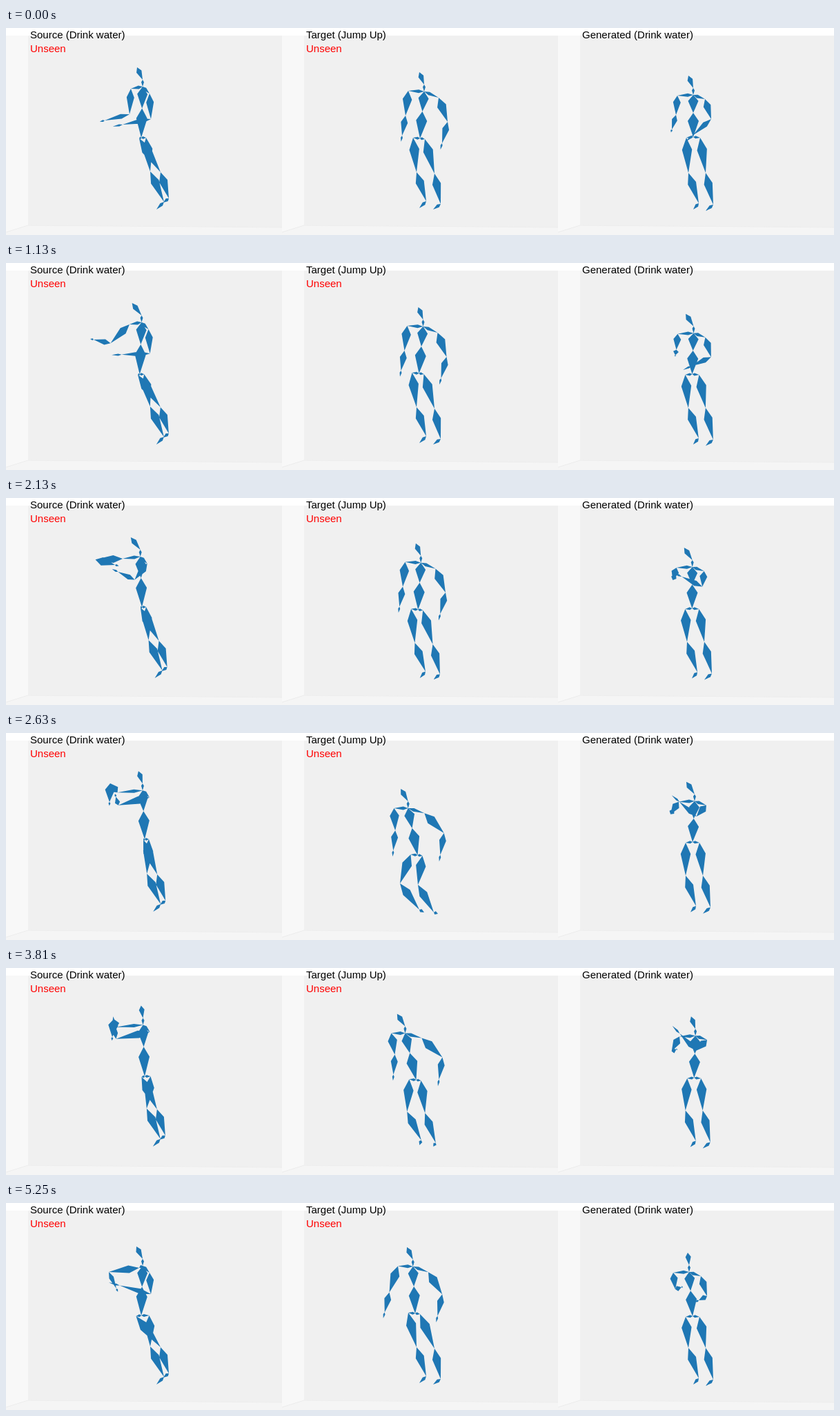
These frames come from a looping animation (1200x300 px, 5.31 s). An HTML page:

```html
<!DOCTYPE html>
<html lang="en">
<head>
<meta charset="utf-8">
<title>Motion transfer</title>
<style>
html, body { margin: 0; width: 100%; height: 100%; overflow: hidden; background: #fff; }
svg { display: block; width: 1200px; height: 300px; }
text { font: 15px "Liberation Sans", Arial, sans-serif; }
.figure { fill: #1f77b4; }
</style>
</head>
<body>
<svg viewBox="0 0 1200 300">
  <defs>
    <g id="room">
      <path d="M0 11H32V286L0 296Z" fill="#f8f8f8"/>
      <path d="M32 11H400V289L32 286Z" fill="#f0f0f0"/>
      <path d="M0 296L32 286L400 289V300H0Z" fill="#f5f5f5"/>
      <path d="M0 296L32 286L400 289" fill="none" stroke="#ececec"/>
    </g>
  </defs>
  <use href="#room"/>
  <use href="#room" x="400"/>
  <use href="#room" x="800"/>
  <path class="figure"/>
  <path class="figure"/>
  <path class="figure"/>
  <text x="35" y="15">Source (Drink water)</text>
  <text x="35" y="35" fill="#f00">Unseen</text>
  <text x="435" y="15">Target (Jump Up)</text>
  <text x="435" y="35" fill="#f00">Unseen</text>
  <text x="835" y="15">Generated (Drink water)</text>
</svg>
<script>
const LOOP = 5310, STEPS = 85;

// Bone widths from the root of each limb outwards.
const SPINE = [8, 4, 15, 16], LEG = [4, 14.5, 12.5, 5];
const armWidths = (upper, fore) => [5, upper, fore, 3];

const add = (p, q, k = 1) => [p[0] + q[0] * k, p[1] + q[1] * k];
const mix = (p, q, k) => [p[0] + (q[0] - p[0]) * k, p[1] + (q[1] - p[1]) * k];

// Eased values between keys of the form [frame, value, ...].
function track(...keys) {
  // Flat at turning points so that nothing overshoots.
  const slope = (i, n) => {
    if (i < 1 || i > keys.length - 2) return 0;
    const rate = k => (keys[k + 1][n] - keys[k][n]) / (keys[k + 1][0] - keys[k][0]);
    const a = rate(i - 1), b = rate(i);
    return a * b <= 0 ? 0 : 2 * a * b / (a + b);
  };
  return frame => {
    const i = keys.findLastIndex(k => k[0] <= frame);
    if (i < 0) return keys[0].slice(1);
    const a = keys[i], b = keys[i + 1];
    if (!b) return a.slice(1);
    const h = b[0] - a[0], s = (frame - a[0]) / h, e = s * s * (3 - 2 * s);
    return a.map((v, n) => n && v + (b[n] - v) * e +
      h * s * (1 - s) * ((1 - s) * slope(i, n) - s * slope(i + 1, n))).slice(1);
  };
}

// Kite-shaped bone, widest a third of the way along.
function kite([x1, y1], [x2, y2], w) {
  const dx = x2 - x1, dy = y2 - y1, half = w / 2 / (Math.hypot(dx, dy) || 1);
  const m = mix([x1, y1], [x2, y2], .34), side = [-dy, dx];
  return 'M' + [[x1, y1], add(m, side, half), [x2, y2], add(m, side, -half)]
    .map(p => p.map(v => v.toFixed(2)).join(' ')).join('L') + 'Z';
}
const chain = (pts, widths) => widths.map((w, i) => kite(pts[i], pts[i + 1], w)).join('');

function spine(neck, pelvis, nod) {
  const base = add(neck, [0, -10]);
  return chain([add(base, [nod, -18]), base, neck, mix(neck, pelvis, .425), pelvis], SPINE);
}

// The hand carries on in the direction of the forearm.
function arm(neck, shoulder, elbow, wrist, widths, hand = .3) {
  return chain([neck, shoulder, elbow, wrist, mix(elbow, wrist, 1 + hand)], widths);
}

function leg(pelvis, hip, knee, ankle, toe) {
  return chain([pelvis, add(pelvis, hip), knee, ankle, toe], LEG);
}

// Shared by both drinkers: how far the second arm is lifted to the mouth.
const raise = track([10, 0], [26, .08], [42, .8], [51, 1], [71, .57], [84, 0]);

const drinker = {
  neck: track([0, 198, 85], [10, 200, 86], [26, 193, 86], [51, 200, 82], [71, 197, 84], [84, 198, 91]),
  pelvis: track([0, 196, 159], [26, 193, 162], [42, 201, 154], [51, 198, 158], [71, 204, 156], [84, 196, 163]),
  nod: track([0, -8], [10, -9], [26, -18], [51, -1], [84, -9]),
  twist: track([0, 5], [42, 4], [51, 9], [71, 4], [84, 9.5]),
  shoulder: track([10, -17], [26, -19], [51, -43], [71, -28], [84, -5]),
  elbow: track([0, 179, 125], [10, 160, 122], [26, 142, 107], [31, 125, 97], [42, 151, 73],
    [71, 157, 75], [84, 149, 100]),
  wrist: track([0, 143, 134], [10, 152, 142], [18, 127, 111], [26, 163, 94], [42, 150, 100],
    [51, 144, 92], [71, 164, 108], [79, 120, 108], [84, 160, 124]),
  lift: track([10, 0], [26, .3], [42, .7], [51, 1], [71, .7], [84, .3]),
  draw(f) {
    const neck = this.neck(f), pelvis = this.pelvis(f), [up] = raise(f), [twist] = this.twist(f);
    const step = p => add(p, [-6, -5], up);
    return spine(neck, pelvis, this.nod(f)[0]) +
      arm(neck, add(neck, [this.shoulder(f)[0], 3]), this.elbow(f), this.wrist(f),
        armWidths(11, 7 + 8 * Math.sqrt(up)), .2) +
      arm(neck, add(neck, [10, 10]), mix([210, 132], [151, 98], up),
        mix([169, 140], [155, 72], this.lift(f)[0]), armWidths(11, 7.5), .35) +
      leg(pelvis, [2 - twist, 1], step([224, 209]), step([236, 247]), step([228, 253])) +
      leg(pelvis, [2 + twist, 0], step([209, 208]), step([229, 252]), step([218, 263]));
  }
};

const jumper = {
  lean: track([32, 0], [42, .9], [51, 1], [71, 1], [84, .42]),
  swing: track([32, 0], [42, .7], [71, 1.05], [84, -.6]),
  crouch: track([32, 0], [42, 1], [47, .5], [51, .35], [56, .35], [64, .6], [71, .1], [84, 0]),
  hop: track([42, 0], [51, 1], [55, 1], [63, 0]),
  draw(f) {
    const [lean] = this.lean(f), [swing] = this.swing(f), [low] = this.crouch(f), [hop] = this.hop(f);
    const pelvis = [600 - f / 12 - 3 * hop, 160 + 17 * low - 42 * hop];
    const neck = add(pelvis, [6 - 22 * lean, -68 + 2 * hop]);
    const from = (rest, shift, k) => add(add(neck, rest), shift, k);
    const knee = p => add(add(p, [-24, 9], low), [-8, -35], hop);
    const foot = p => add(add(p, [-10, 5], low), [-13, -27], hop);
    const toe = p => foot(add(p, [17, -6], low * (1 - hop)));
    const widths = armWidths(13.5, 10);
    return spine(neck, pelvis, -7 - 4 * lean - 4 * hop) +
      arm(neck, from([-23, -1], [3, 1], lean), from([-27, 35], [12, -4], swing),
        from([-32, 64], [15, -4], swing), widths) +
      arm(neck, from([21, 9], [3, -2], lean), from([34, 44], [20, -9], lean),
        from([26, 75], [23, -8], lean), widths) +
      leg(pelvis, [-10, -1], knee([595, 209]), foot([609, 251]), toe([599, 261])) +
      leg(pelvis, [7, 1], knee([621, 211]), foot([630, 255]), toe([619, 263]));
  }
};

const follower = {
  neck: track([0, 996, 97], [10, 1000, 102], [26, 993, 101], [51, 1000, 98], [71, 997, 99], [84, 990, 100]),
  pelvis: track([0, 996, 158], [26, 994, 162], [42, 995, 158], [51, 996, 158], [71, 998, 161], [84, 995, 164]),
  nod: track([0, -7], [10, -11], [42, -12], [51, -9], [84, -2]),
  // Arm joints, relative to the neck.
  elbow: track([10, -25, 29], [26, -25, 19], [51, -39, 19], [71, -27, 26], [84, -20, 25]),
  wrist: track([0, -31, 50], [10, -32, 56], [26, -21, 8], [51, -33, 13], [71, -19, 25], [84, -11, 22]),
  reach: track([10, 0, 58], [26, -8, 30], [42, -22, 1], [51, -25, -6], [71, -17, 3], [84, 14, 41]),
  draw(f) {
    const neck = this.neck(f), pelvis = this.pelvis(f), [up] = raise(f);
    const at = p => add(neck, p), step = p => add(p, [-5, -4], up);
    const widths = armWidths(11, 8);
    return spine(neck, pelvis, this.nod(f)[0]) +
      arm(neck, at([-23, 1]), at(this.elbow(f)), at(this.wrist(f)), widths, .2) +
      arm(neck, at([17, 6]), at(mix([26, 35], [-3, 19], up)), at(this.reach(f)), widths, .45) +
      leg(pelvis, [-10, 1], step([989, 210]), step([1004, 254]), step([996, 263])) +
      leg(pelvis, [10, 1], step([1014, 210]), step([1025, 256]), step([1014, 265]));
  }
};

const figures = [drinker, jumper, follower];
const paths = document.querySelectorAll('.figure');

function tick() {
  const t = performance.now() % LOOP;
  const frame = Math.min(STEPS - 1, Math.floor(t / LOOP * STEPS + .08));
  figures.forEach((figure, i) => paths[i].setAttribute('d', figure.draw(frame)));
  requestAnimationFrame(tick);
}
tick();
</script>
</body>
</html>
```
